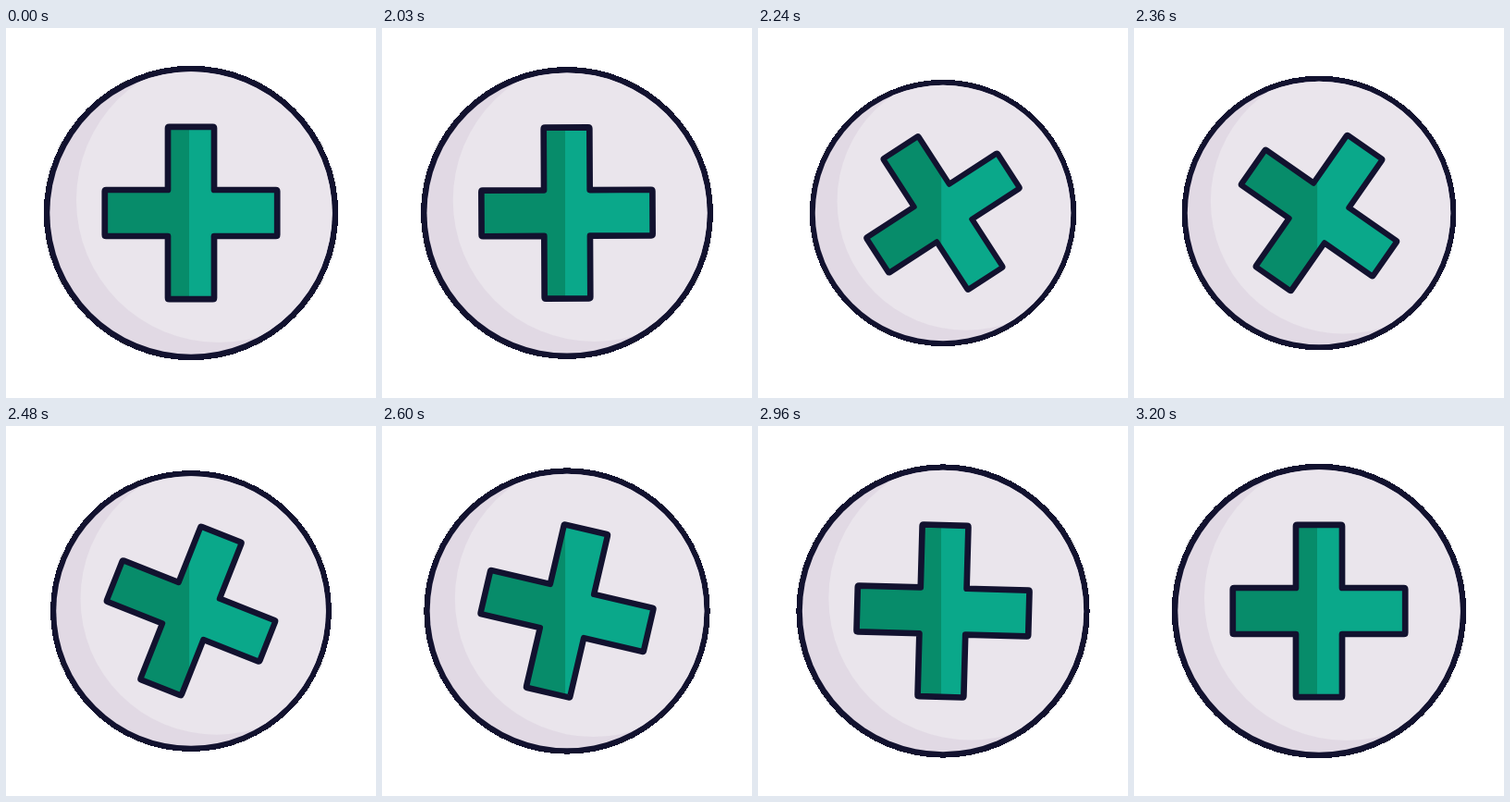
Write an HTML page that moves like this. It is 400x400 px and loops after 3230 ms.

```html
<!DOCTYPE html>
<html lang="en">
<head>
<meta charset="utf-8">
<title>Medical cross</title>
<style>
  html, body { margin: 0; width: 100%; height: 100%; overflow: hidden; background: #fff; }
  svg { display: block; width: 100%; height: 100%; }
  .line { fill: none; stroke: #12122f; stroke-width: 6.7; stroke-linejoin: round; }
</style>
</head>
<body>
<svg viewBox="-200 -200 400 400">
  <defs>
    <path id="cross" d="M-23.5-93.2H23.5Q25-93.2 25-91.7V-25H91.7Q93.2-25 93.2-23.5V23.5Q93.2 25 91.7 25H25V91.7Q25 93.2 23.5 93.2H-23.5Q-25 93.2-25 91.7V25H-91.7Q-93.2 25-93.2 23.5V-23.5Q-93.2-25-91.7-25H-25V-91.7Q-25-93.2-23.5-93.2Z"/>
    <clipPath id="disc"><circle r="152.7"/></clipPath>
    <clipPath id="inside"><use href="#cross" class="turn"/></clipPath>
  </defs>
  <g id="badge">
    <!-- Hard outer rim, smooth inner edge -->
    <circle r="159.2" fill="#12122f" shape-rendering="crispEdges"/>
    <circle r="152.7" fill="#e1d9e4"/>
    <circle id="light" cy="-14" r="154" fill="#eae5ec" clip-path="url(#disc)"/>
    <!-- The shade line stays upright while the cross turns -->
    <g clip-path="url(#inside)">
      <rect x="-140" y="-140" width="280" height="280" fill="#0aa88a"/>
      <rect x="-140" y="-140" width="138" height="280" fill="#078c6a"/>
    </g>
    <use href="#cross" class="line turn"/>
  </g>
</svg>
<script>
  const LOOP = 3230, START = 2000, STEP = 30, SPAN = 1200, DIP = 180;
  const badge = document.getElementById('badge');
  const light = document.getElementById('light');
  const turning = document.querySelectorAll('.turn');

  // Cubic Bezier easing with flat ends: control points (x1, 0) and (x2, 1)
  function ease(x, x1, x2) {
    if (x <= 0 || x >= 1) return Math.min(1, Math.max(0, x));
    let lo = 0, hi = 1, s;
    for (let i = 0; i < 30; i++) {
      s = (lo + hi) / 2;
      const bx = 3 * s * (1 - s) * ((1 - s) * x1 + s * x2) + s ** 3;
      if (bx < x) lo = s; else hi = s;
    }
    return s * s * (3 - 2 * s);
  }

  function draw(now) {
    const t = now % LOOP - START;
    const held = Math.max(0, Math.floor(t / STEP) * STEP);
    const angle = -90 * ease(held / SPAN, 0.26, 0.067);
    const dip = held < DIP
      ? ease(held / DIP, 0.33, 0.67)
      : 1 - ease((held - DIP) / (SPAN - DIP), 0.14, 0.24);
    badge.setAttribute('transform', `scale(${1 - 0.1 * dip})`);
    light.setAttribute('cx', 30 - 2.5 * dip);
    for (const el of turning) el.setAttribute('transform', `rotate(${angle})`);
  }

  function tick() {
    draw(performance.now());
    requestAnimationFrame(tick);
  }
  tick();
</script>
</body>
</html>
```
